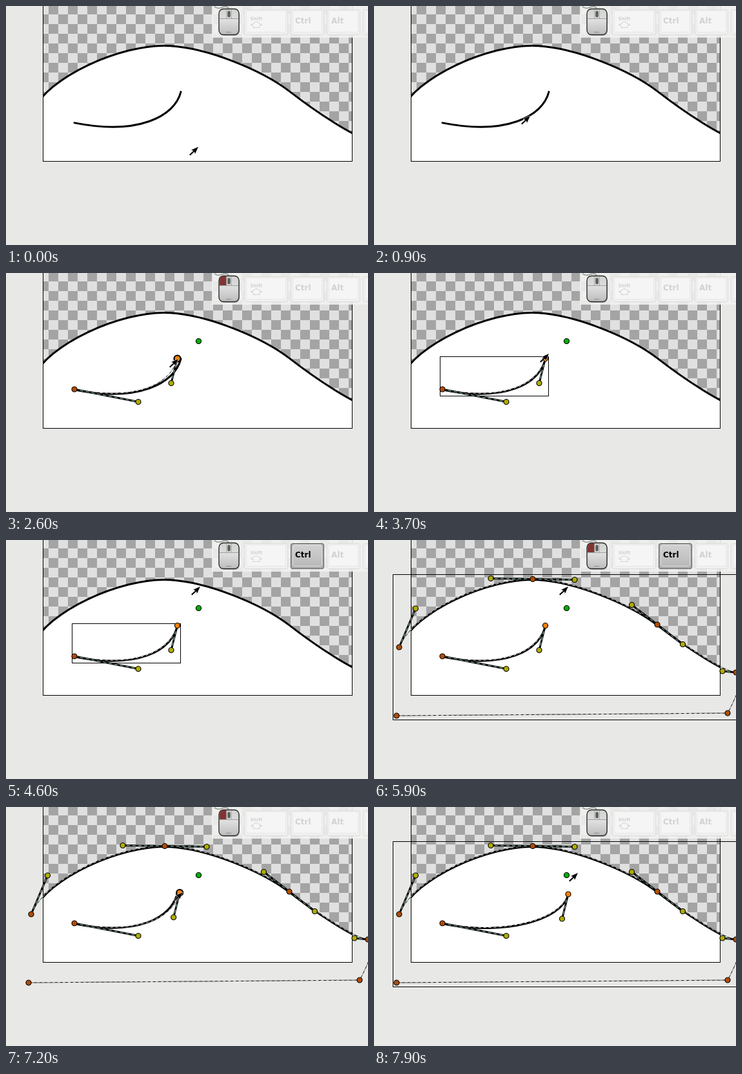
Recreate the animation shown at these times as an HTML page. Size 561 by 370 pixels, loop 8000 ms.

```html
<!DOCTYPE html>
<html lang="en">
<head>
<meta charset="utf-8">
<title>Editing splines</title>
<style>
  html, body { margin: 0; width: 100%; height: 100%; overflow: hidden; background: #e8e8e6; }
  svg { display: block; }
  path { fill: none; }
  text { font-family: "DejaVu Sans", sans-serif; font-weight: bold; font-size: 12px; }
  .ink { stroke: #000; stroke-width: 3; stroke-linecap: round; }
  .thin { stroke: #000; stroke-width: 1; }
  .dash { stroke: #c4c8c6; stroke-width: 1; stroke-dasharray: 4 4; }
  .arm { stroke: #000; stroke-width: 3; }
  .armDash { stroke: #9fd0bb; stroke-width: 1; stroke-dasharray: 5 4; }
  .frame { fill: none; stroke: #000; shape-rendering: crispEdges; }
  .knob { stroke: #000; stroke-width: 1.2; }
  .hot { stroke-width: 2.2; }
  .key rect { fill: #f0f0f0; stroke: #dcdcdc; }
  .key text { fill: #d2d2d2; }
  .key path { stroke: #d2d2d2; }
  .key .top { fill: #f5f5f5; stroke: #e8e8e8; }
  .key.on rect { fill: #a9a9a9; stroke: #606060; }
  .key.on .top { fill: url(#keyFace); stroke: #e2e2e2; }
  .key.on text { fill: #000; }
  #cursor { fill: #000; stroke: #fff; paint-order: stroke; }
</style>
</head>
<body>
<svg width="561" height="370">
  <defs>
    <pattern id="checks" x="66" y="-2" width="30" height="30" patternUnits="userSpaceOnUse">
      <rect width="30" height="30" fill="#e0e0e0"/>
      <path d="M0 0h15v15h-15zM15 15h15v15h-15z" style="fill:#a4a4a4"/>
    </pattern>
    <clipPath id="page"><rect x="57" y="-30" width="480" height="271"/></clipPath>
    <linearGradient id="keyFace" x2="0" y2="1">
      <stop stop-color="#d2d2d2"/><stop offset="1" stop-color="#b9b9b9"/>
    </linearGradient>
    <linearGradient id="shell" x2="0" y2="1">
      <stop stop-color="#d0d2d0"/><stop offset=".45" stop-color="#dedede"/><stop offset="1" stop-color="#bcbcbc"/>
    </linearGradient>
  </defs>

  <g clip-path="url(#page)">
    <rect x="57" y="-30" width="480" height="270" fill="url(#checks)"/>
    <g transform="translate(0 .9)">
      <path id="hillFill" style="fill:#fff"/>
      <path id="hillInk" class="ink"/>
      <path id="strokeInk" class="ink"/>
    </g>
  </g>
  <rect class="frame" x="57.5" y="-30.5" width="479" height="271"/>

  <rect id="hillBox" class="frame" x="29.5" y="53.5" width="580" height="225"/>
  <rect id="strokeBox" class="frame" x="102.5" height="61"/>
  <g id="hillTools"></g>
  <g id="strokeTools"></g>
  <circle id="origin" class="knob" cx="298.5" cy="105.5" r="4" fill="#00b000"/>

  <g id="panel">
    <rect x="319" width="242" height="49" fill="#f2f2f1" opacity=".88"/>
    <path d="M345 5C345 1 340 0 335 2S328 4 323 1" stroke="#8f9990" stroke-width="1.5"/>
    <rect x="331" y="6" width="31" height="40" rx="7" opacity=".25"/>
    <rect x="330" y="4.5" width="31" height="40" rx="7" fill="url(#shell)" stroke="#2c2c2c" stroke-width="1.4"/>
    <path id="button" d="M331 19V11Q331 5 337 5H341.5V19Z" style="fill:#823434"/>
    <path d="M331 19.5H360M342 5V19M349 5V19" stroke="#a0a0a0"/>
    <rect x="344" y="8" width="3" height="9" rx="1.5" fill="#5d6b60" stroke="#3c453f"/>
    <path d="M341 40.5H349" stroke="#8d8d8d"/>
  </g>

  <path id="cursor" d="M0 0L-11 5L-7.5 6L-14 12L-12.5 13.5L-6 7.5L-5 11Z"/>
</svg>

<script>
const $ = id => document.getElementById(id);
const show = (id, on) => $(id).setAttribute('visibility', on ? 'visible' : 'hidden');
const within = (t, ...spans) => spans.some(([a, b]) => t >= a && t < b);

const add = ([x, y], [dx, dy], k = 1) => [x + k * dx, y + k * dy];
const mix = (a, b, u) => a.map((v, i) => v + (b[i] - v) * u);
const ease = (t, from, to) => {
  const u = Math.min(1, Math.max(0, (t - from) / (to - from)));
  return u * u * (3 - 2 * u);
};

const BROWN = '#b04e00', ORANGE = '#ff8000', YELLOW = '#b0ac00';

// A node is a point and a tangent; handles lie at point ± tangent
const node = (x, y, dx = 0, dy = 0) => ({ p: [x, y], d: [dx, dy] });
const after = n => add(n.p, n.d);
const before = n => add(n.p, n.d, -1);
const spline = nodes => nodes.map((n, i) =>
  i ? `C${after(nodes[i - 1])} ${before(n)} ${n.p}` : `M${n.p}`).join('');

const guide = d => `<path class="thin" d="${d}"/><path class="dash" d="${d}"/>`;
const arm = (a, b) => `<path class="arm" d="M${a}L${b}"/><path class="armDash" d="M${a}L${b}"/>`;
const knob = ([x, y], color, hot) =>
  `<circle class="knob ${hot ? 'hot' : ''}" cx="${x}" cy="${y}" r="${hot ? 5 : 4}" fill="${color}"/>`;

// Guides, handle arms and knobs of an open spline
function tools(nodes, lastColor = BROWN, hot = false) {
  const last = nodes.length - 1;
  const arms = nodes.flatMap((n, i) => [i > 0 && [n.p, before(n)], i < last && [n.p, after(n)]]).filter(Boolean);
  return guide(spline(nodes)) + arms.map(([a, b]) => arm(a, b) + knob(b, YELLOW)).join('') +
    nodes.map((n, i) => i < last ? knob(n.p, BROWN) : knob(n.p, lastColor, hot)).join('');
}

const ridge = [node(39, 166, 25.5, -60), node(246, 60.5, 65, 1), node(439, 131, 39.5, 30.5), node(561, 205, 21, 2)];
const corners = [node(548, 268), node(35, 272)];
const rightEdge = [corners[0], node(561, 205, -21, -2)];

$('hillInk').setAttribute('d', spline(ridge));
$('hillFill').setAttribute('d', `${spline(ridge)}L${corners[0].p}L${corners[1].p}Z`);
$('hillTools').innerHTML = guide(spline(corners)) + guide(spline(rightEdge)) + tools(ridge) +
  corners.map(n => knob(n.p, BROWN)).join('');

const strokeTo = ([x, y]) => [node(106, 180, 99, 19.5), node(x, y, 9.5, -38)];

const key = (id, x, width, label, size = 12) =>
  `<g class="key" id="${id}" transform="translate(${x} 5)">
   <rect x=".5" y=".5" width="${width - 1}" height="39" rx="2.5"/>
   <rect class="top" x="3.5" y="2.5" width="${width - 7}" height="33" rx="2.5"/>
   <text x="${size < 12 ? 9.5 : 7}" y="${size + 10}" style="font-size:${size}px">${label}</text></g>`;
$('panel').insertAdjacentHTML('beforeend',
  key('shift', 369, 68, 'Shift', 7) + key('ctrl', 441, 52, 'Ctrl') +
  key('alt', 497, 52, 'Alt') + key('next', 553, 52, ''));
$('shift').insertAdjacentHTML('beforeend', '<path d="M19 19l9 5.5h-4v4h-10v-4h-4z"/>');

// The right end of the stroke is dragged twice
const vertexAt = t =>
  mix(mix([271, 132], [265.5, 132.5], ease(t, 2500, 2600)), [301, 135], ease(t, 7100, 7600));

// The pointer visits the stroke, its vertex, the hill, the vertex again, then leaves
function pointerAt(t) {
  const vertex = vertexAt(t);
  let p = [298, 218];
  p = mix(p, [242, 170], ease(t, 100, 900));
  p = mix(p, add(vertex, [1, 0]), ease(t, 1800, 2300));
  p = mix(p, [301, 72], ease(t, 3500, 4400));
  p = mix(p, add(vertex, [5, -1]), ease(t, 6200, 7000));
  return mix(p, [316, 102], ease(t, 7700, 7900));
}

function draw(t) {
  const end = vertexAt(t), stroke = strokeTo(end);
  const selected = t >= 1700, both = t >= 5900;
  const dragging = within(t, [2600, 3100], [7200, 7900]);

  // Paint catches up only after the button is released
  const paintTime = t < 3200 ? 0 : t < 7900 ? 3200 : t;
  $('strokeInk').setAttribute('d', spline(strokeTo(vertexAt(paintTime))));
  $('strokeTools').innerHTML =
    tools(stroke, t < 2400 ? BROWN : ORANGE, within(t, [2300, 3600], [7100, 7800]));
  $('strokeBox').setAttribute('y', Math.round(end[1]) - 3.5);
  $('strokeBox').setAttribute('width', Math.round(end[0]) - 99 + 1);

  show('strokeTools', selected);
  show('origin', selected);
  show('hillTools', both);
  show('strokeBox', selected && !both && !dragging);
  show('hillBox', both && !dragging);
  show('button', within(t, [1600, 1800], [2400, 3000], [5800, 6100], [7200, 7800]));
  $('ctrl').classList.toggle('on', within(t, [4600, 6700]));
  $('cursor').setAttribute('transform', `translate(${pointerAt(t).map(Math.round)})`);
}

function tick() {
  draw(Math.floor(performance.now() % 8000 / 100) * 100);
  requestAnimationFrame(tick);
}
tick();
</script>
</body>
</html>
```
